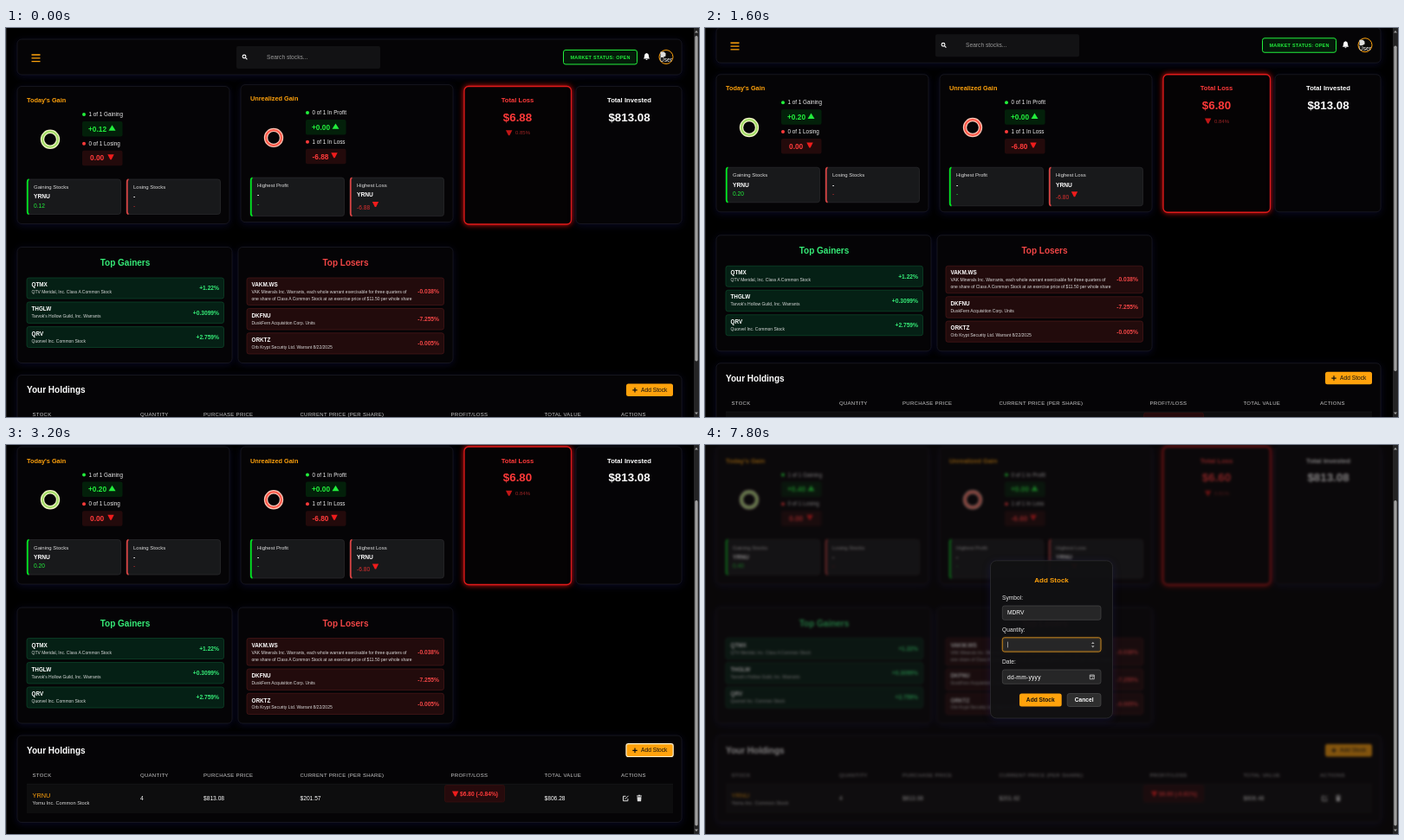
These frames come from a looping animation (800 px wide and 450 px high, 8000 ms). An HTML page:

```html
<!DOCTYPE html>
<html lang="en">
<head>
<meta charset="utf-8">
<title>Portfolio dashboard</title>
<style>
  html, body { margin: 0; width: 100%; height: 100%; overflow: hidden; background: #000; }
  svg { display: block; width: 800px; height: 450px; }
  text { font-family: "Liberation Sans", Arial, sans-serif; white-space: pre; }
  .card { filter: drop-shadow(0 2px 4px rgba(30, 30, 130, .26)); }
  .alarm { filter: drop-shadow(0 0 3px rgba(255, 20, 20, .85)); }
  .focus { filter: drop-shadow(0 0 1px rgba(255, 165, 0, .3)); }
</style>
</head>
<body>
<svg id="stage" viewBox="0 0 800 450"></svg>
<script>
const LOOP = 8000, INVESTED = 813.08, SHARES = 4, MAX_SCROLL = 65.5;
const ORANGE = '#ffa20c', GREEN = '#22ee3c', RED = '#ff3a3a', MINT = '#36ec78', WHITE = '#fff';
const TICKER = 'YRNU', TYPED = 'MDRV';

const LOSSES = [[0, 6.88], [900, 6.80], [3900, 6.72], [5100, 6.60]];
const KEY_TIMES = [5700, 6100, 6500, 6900];
const SYMBOL_FOCUS = 4300, QUANTITY_FOCUS = 7380;

const stage = document.getElementById('stage');
let parent = stage;
const liveTexts = [];

function add(tag, attrs) {
  const el = document.createElementNS('http://www.w3.org/2000/svg', tag);
  for (const key in attrs) el.setAttribute(key, attrs[key]);
  return parent.appendChild(el);
}

function group(draw, attrs = {}) {
  const outer = parent, g = add('g', attrs);
  parent = g;
  draw();
  parent = outer;
  return g;
}

// Corners, not sizes: left, top, right, bottom.
const box = (x1, y1, x2, y2, fill, stroke = 'none', rx = 2.5, more = {}) =>
  add('rect', { x: x1, y: y1, width: x2 - x1, height: y2 - y1, fill, stroke, rx, 'stroke-width': .7, ...more });

const card = (x1, y1, x2, y2) => box(x1, y1, x2, y2, '#050406', '#1d1d28', 5, { class: 'card' });
const path = (d, fill, stroke = 'none', width = 1, more = {}) =>
  add('path', { d, fill, stroke, 'stroke-width': width, ...more });
const circle = (cx, cy, r, fill, stroke = 'none', width = 1) =>
  add('circle', { cx, cy, r, fill, stroke, 'stroke-width': width });

// y is the middle of the capitals; content may be a function of the loss.
function text(x, y, content, size, fill = WHITE, more = {}) {
  const el = add('text', { x, y: y + size * .355, 'font-size': size, fill, ...more });
  if (typeof content === 'function') liveTexts.push([el, content]);
  else el.textContent = content;
  return el;
}
const bold = (x, y, content, size, fill, more = {}) =>
  text(x, y, content, size, fill, { 'font-weight': 700, ...more });
const MIDDLE = { 'text-anchor': 'middle' }, END = { 'text-anchor': 'end' };

const up = (x, y) => path(`M${x - 4} ${y + 3}h8l-4-6.4z`, GREEN);
const down = (x, y, more) => path(`M${x - 3.7} ${y - 3}h7.4l-3 6h-1.4z`, '#f01c1c', 'none', 0, more);

const gain = loss => (7 - loss).toFixed(2);
const percent = loss => (loss / INVESTED * 100).toFixed(2) + '%';

function ring(x, y, edge, core) {
  circle(x, y, 9, 'none', edge, 4.4);
  circle(x, y, 9, 'none', core, 2);
}

function tally(x, y, label, content, good) {
  circle(x + 2, y, 2, good ? GREEN : RED);
  text(x + 7.5, y, label, 6.33, '#eee');
  box(x, y + 8, x + 46.5, y + 25.5, good ? '#03200a' : '#230a0b', 'none', 2);
  bold(x + (good ? 7 : content === '0.00' ? 9 : 7.5), y + 16.8, content, 8.33, good ? GREEN : RED);
  good ? up(x + 34.5, y + 15.7) : down(x + 33, y + 15.5);
}

function tile(x, bottom, label, ticker, content, good, arrow) {
  box(x, 175, x + 108.5, bottom, '#18191b', '#2b2c2e', 3);
  path(`M${x + 2.5} 175.2q-1.7 .3-1.7 3V${bottom - 3}q0 2.5 1.7 2.8`, 'none', good ? '#00e622' : '#d54343', 1.8);
  text(x + 8, 184, label, 6, '#ddd');
  bold(x + 8, 195, ticker, 6.67);
  text(x + 8, arrow ? 209.3 : 205.6, content, 6.67, good ? GREEN : '#dc2f2f');
  if (arrow) down(x + 29.5, 206);
}

function mover(x, top, bottom, ticker, lines, change, good) {
  box(x, top, x + 227.5, bottom, good ? '#052015' : '#220b0c', good ? '#0d4a2b' : '#4d1719');
  bold(x + 5.5, top + 8, ticker, 6.33);
  lines.forEach((line, i) => text(x + 5.5, top + 16.3 + 8 * i, line, 5, '#ddd'));
  bold(x + 222, (top + bottom) / 2, change, 6.67, good ? MINT : '#f24646', END);
}

function drawHeader() {
  card(13, 13, 780, 54);
  path('M29.5 31h10M29.5 34.8h10M29.5 38.6h10', 'none', ORANGE, 1.3);
  box(266, 21, 432, 47, '#121214', 'none', 2);
  circle(275, 33, 1.9, 'none', WHITE, 1.1);
  path('M276.4 34.4l2 2', 'none', WHITE, 1.2);
  text(301, 33.5, 'Search stocks...', 6.67, '#999');
  box(643.5, 25.5, 728.5, 42, '#041a09', GREEN, 2.5, { 'stroke-width': 1 });
  bold(686, 33.6, 'MARKET STATUS: OPEN', 5.5, GREEN, { ...MIDDLE, 'letter-spacing': .21 });
  path('M736 35.5q1-1 1-3.5q0-2.6 2.5-3q2.5.4 2.5 3q0 2.5 1 3.5zM738.3 36h2.4q-1.2 2-2.4 0z', WHITE);
  circle(762, 33.5, 8, '#070707', ORANGE, 1);
  path('M755.5 27.5h4l2 2v3l-3 1.5h-3z', '#ddd');
  text(762, 37, 'User', 6.67, WHITE, MIDDLE);
}

function drawTodaysGain() {
  card(13, 67.5, 258, 226.5);
  bold(24, 83.5, "Today's Gain", 7.33, ORANGE);
  ring(51, 128.8, '#f0f2c4', '#9fdc62');
  tally(88, 100, '1 of 1 Gaining', loss => '+' + gain(loss), true);
  tally(88, 133.7, '0 of 1 Losing', '0.00', false);
  tile(24, 215.5, 'Gaining Stocks', TICKER, gain, true);
  tile(139, 215.5, 'Losing Stocks', '-', '-', false);
}

function drawUnrealizedGain() {
  card(271, 67.5, 516, 226.5);
  bold(282, 83.5, 'Unrealized Gain', 7.33, ORANGE);
  ring(309, 128.8, '#ffc4b4', '#ff5546');
  tally(346, 100, '0 of 1 In Profit', '+0.00', true);
  tally(346, 133.7, '1 of 1 In Loss', loss => '-' + loss.toFixed(2), false);
  tile(282, 219.5, 'Highest Profit', '-', '-', true);
  tile(397, 219.5, 'Highest Loss', TICKER, loss => '-' + loss.toFixed(2), false, true);
}

function drawTotals() {
  box(529, 67.5, 652.5, 227, '#050304', '#e01a1a', 5, { class: 'alarm', 'stroke-width': 1.3 });
  bold(590.5, 83.5, 'Total Loss', 7.67, RED, MIDDLE);
  bold(590.5, 103, loss => '$' + loss.toFixed(2), 13.33, RED, MIDDLE);
  down(580.7, 121.2, { opacity: .8 });
  text(588, 121.3, percent, 6, RED, { opacity: .6 });
  card(658, 67.5, 780, 226.5);
  bold(719.5, 83.5, 'Total Invested', 7.67, WHITE, MIDDLE);
  bold(719.5, 103, '$' + INVESTED, 13.33, WHITE, MIDDLE);
}

function drawMovers() {
  card(13, 253.5, 261, 387.5);
  bold(137.5, 271.5, 'Top Gainers', 10, MINT, MIDDLE);
  mover(24, 289, 313, 'QTMX', ['QTV Meridal, Inc. Class A Common Stock'], '+1.22%', true);
  mover(24, 317, 341.5, 'THGLW', ["Tarvok's Hollow Guild, Inc. Warrants"], '+0.3099%', true);
  mover(24, 345.5, 369.5, 'QRV', ['Quorvel Inc. Common Stock'], '+2.759%', true);
  card(268, 253.5, 516, 387.5);
  bold(392, 271.5, 'Top Losers', 10, '#f24646', MIDDLE);
  mover(278, 289, 320.5, 'VAKM.WS', [
    'VAK Minerals Inc. Warrants, each whole warrant exercisable for three quarters of',
    'one share of Class A Common Stock at an exercise price of $11.50 per whole share'], '-0.038%');
  mover(278, 324.5, 349, 'DKFNU', ['DuskFern Acquisition Corp. Units'], '-7.255%');
  mover(278, 352.8, 377, 'ORKTZ', ['Orb Krypt Security Ltd. Warrant 8/22/2025'], '-0.005%');
}

let buttonRing;
function drawHoldings() {
  card(13, 401.5, 780, 502);
  bold(24, 418.8, 'Your Holdings', 10);
  box(716, 411.5, 770, 426, ORANGE);
  buttonRing = box(716, 411.2, 770.2, 426, 'none', '#fff0d0', 2.5, { class: 'focus', 'stroke-width': 1.2 });
  path('M723.3 418.8h5.4M726 416.1v5.4', 'none', '#111', 1.2);
  text(733, 418.6, 'Add Stock', 6.67, '#111');
  const columns = { 30.5: 'STOCK', 155: 'QUANTITY', 228: 'PURCHASE PRICE', 339.5: 'CURRENT PRICE (PER SHARE)',
    513.5: 'PROFIT/LOSS', 621.5: 'TOTAL VALUE', 710: 'ACTIONS' };
  for (const x in columns) text(x, 447.2, columns[x], 6, '#ccc', { 'letter-spacing': .29 });
  box(24, 457.8, 770, 491.5, '#0d0d0e', 'none', 0);
  path('M24 457.8H770', 'none', '#1d1d1f', .6);
  text(30.5, 470.5, TICKER, 7.33, ORANGE);
  text(30.5, 479.7, 'Yornu Inc. Common Stock', 5.7, '#ddd');
  text(155, 474.5, SHARES, 6.67);
  text(228, 474.5, '$' + INVESTED, 6.67);
  text(339.5, 474.5, loss => '$' + ((INVESTED - loss) / SHARES).toFixed(2), 6.67);
  box(506.5, 459, 575.5, 478.5, '#260a0c', '#38100f', 2);
  down(518.7, 469);
  bold(524, 469, loss => `$${loss.toFixed(2)} (-${percent(loss)})`, 6.67, RED);
  text(621.5, 474.5, loss => '$' + (INVESTED - loss).toFixed(2), 6.67);
  path('M715.5 471.8h-3v5.4h5.4v-2.6M714.5 475.3l4-4', 'none', '#ddd', 1);
  path('M728 471h6v1.1h-6zM729.8 470.3h2.4v.7h-2.4zM728.5 472.7h5l-.4 5h-4.2z', '#ddd');
}

function field(top, label) {
  text(343, top - 9, label, 6.67, '#e4e4e4');
  box(343.3, top, 457, top + 16.3, '#262627', '#4a4a4a');
}
const focusRing = top =>
  box(343.3, top, 457, top + 16.3, 'none', '#d98a10', 2.5, { class: 'focus', 'stroke-width': .8 });

let symbolRing, quantityRing, typedText, caret, spinner;
function drawModal() {
  box(329.5, 133.8, 470.5, 316, 'rgba(18,18,18,.93)', '#333336', 7, { class: 'card' });
  bold(400, 156.5, 'Add Stock', 8, ORANGE, MIDDLE);
  field(186, 'Symbol:');
  field(222.8, 'Quantity:');
  field(260, 'Date:');
  symbolRing = focusRing(186);
  quantityRing = focusRing(222.8);
  typedText = text(349, 194, '', 6.67);
  caret = box(0, -3.4, .6, 3.4, '#ddd', 'none', 0);
  spinner = path('M446 230h3.6l-1.8-2.2zM446 232.2h3.6l-1.8 2.2z', '#aaa');
  text(349, 268.2, 'dd-mm-yyyy', 6.67, WHITE, { 'letter-spacing': .25 });
  path('M444.3 266h5v4.8h-5zM444.3 267.3h5M446.7 269.4h1.4', 'none', '#ccc', .8);
  box(363, 287.5, 411.7, 302.5, ORANGE);
  bold(387.3, 295, 'Add Stock', 6.67, '#111', MIDDLE);
  box(418.2, 287.5, 457, 302.5, '#2e2e2e', '#4c4c4c');
  bold(437.7, 295, 'Cancel', 6.67, WHITE, MIDDLE);
}

const page = group(() => {
  box(0, 0, 800, 520, '#000', 'none', 0);
  drawHeader();
  drawTodaysGain();
  drawTotals();
  drawMovers();
  drawHoldings();
});
parent = page;
const hoverCard = group(drawUnrealizedGain);
parent = stage;
const shade = box(0, 0, 800, 450, '#120f10', 'none', 0);
const modal = group(drawModal);
box(0, 0, .8, 450, '#2a2a2b', 'none', 0);
box(794, 0, 800, 450, '#242425', 'none', 0);
path('M795 5.5h4l-2-2.8zM795 444.5h4l-2 2.8z', '#9c9c9c');
const thumb = box(795.3, 9, 798.7, 385.5, '#a0a0a0', 'none', 1.7);

const ramp = (t, start, length) => Math.min(1, Math.max(0, (t - start) / length));
const smooth = u => u * u * (3 - 2 * u);

function render(t) {
  const loss = LOSSES.filter(([start]) => t >= start).pop()[1];
  for (const [el, content] of liveTexts) el.textContent = content(loss);

  const scroll = smooth(ramp(t, 1424, 600));
  page.setAttribute('transform', `translate(0 ${-MAX_SCROLL * scroll})`);
  thumb.setAttribute('transform', `translate(0 ${55 * scroll})`);
  hoverCard.setAttribute('transform', `translate(0 ${-1.9 * (1 - smooth(ramp(t, 300, 300)))})`);

  const open = smooth(ramp(t, 3250, 300));
  page.style.filter = open ? `blur(${1.6 * open}px)` : 'none';
  shade.setAttribute('opacity', .52 * open);
  modal.setAttribute('opacity', open);
  buttonRing.setAttribute('opacity', ramp(t, 3000, 150) * (1 - ramp(t, SYMBOL_FOCUS, 300)));

  const inQuantity = t >= QUANTITY_FOCUS;
  symbolRing.setAttribute('opacity', ramp(t, SYMBOL_FOCUS, 300) * (1 - ramp(t, QUANTITY_FOCUS, 300)));
  quantityRing.setAttribute('opacity', ramp(t, QUANTITY_FOCUS, 300));
  spinner.setAttribute('opacity', +inQuantity);

  const keys = KEY_TIMES.filter(time => t >= time);
  typedText.textContent = TYPED.slice(0, keys.length);
  const lastInput = inQuantity ? QUANTITY_FOCUS : keys.length ? keys.at(-1) : SYMBOL_FOCUS;
  const caretX = inQuantity || !keys.length ? 349 : 349.2 + typedText.getComputedTextLength();
  caret.setAttribute('transform', `translate(${caretX} ${inQuantity ? 231 : 194.2})`);
  caret.setAttribute('opacity', t >= SYMBOL_FOCUS && (t - lastInput) % 1000 < 500 ? 1 : 0);
}

const begin = performance.now();
function tick() {
  render((performance.now() - begin) % LOOP);
  requestAnimationFrame(tick);
}
tick();
</script>
</body>
</html>
```
